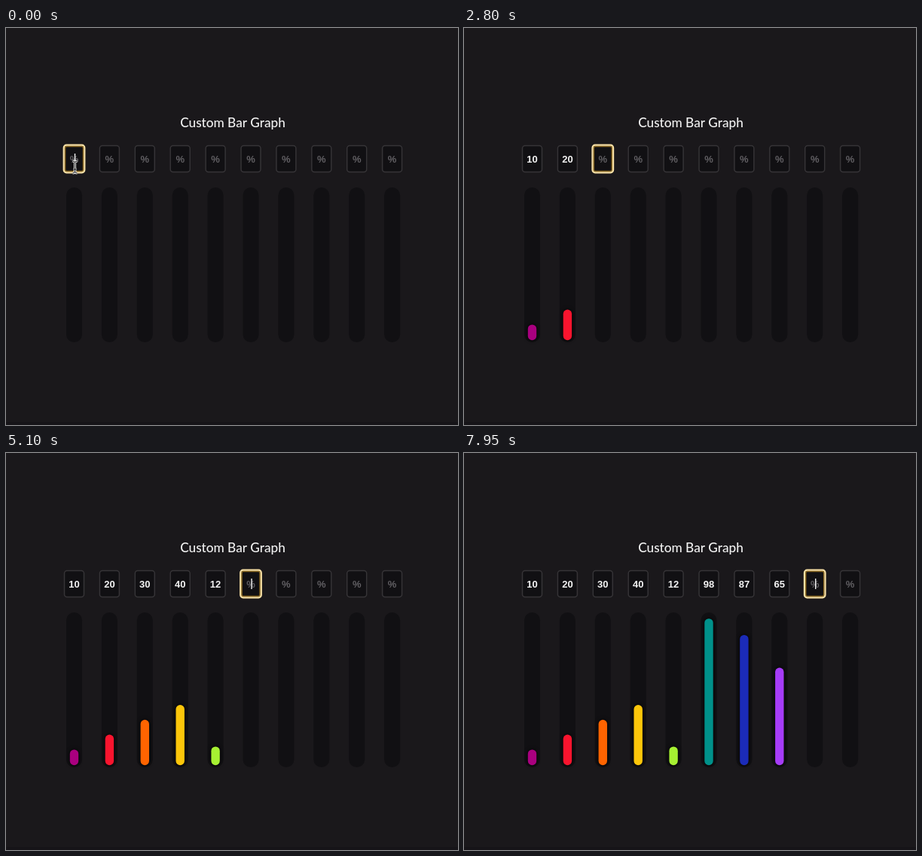
Animation of 600x528 px, one loop 8 s. Source, as an HTML page with a canvas:

```html
<!DOCTYPE html>
<html lang="en">
<head>
<meta charset="utf-8">
<title>Custom Bar Graph</title>
<style>
  html, body { margin: 0; width: 100%; height: 100%; overflow: hidden; background: #1a181b; }
  canvas { display: block; }
</style>
</head>
<body>
<canvas width="600" height="528"></canvas>
<script>
const ctx = document.querySelector('canvas').getContext('2d');
const LOOP = 8000, BLINK = 450, GROW = 400;
const FIELDS = 10, FIRST_X = 90.5, STEP = 46.9;

// One entry per filled field: value, colour, times of both digits and of Tab.
const entries = [
  ['10', '#a9007f', 1200, 1400, 1650],
  ['20', '#f9142e', 2050, 2200, 2300],
  ['30', '#ff6400', 2900, 3000, 3150],
  ['40', '#fcc60a', 3400, 3550, 3750],
  ['12', '#a6f032', 4350, 4500, 4700],
  ['98', '#00918a', 5500, 5700, 6100],
  ['87', '#1b2bb8', 6600, 6700, 6850],
  ['65', '#a63cf8', 7250, 7400, 7600]
].map(([value, color, first, second, tab]) => ({ value, color, first, second, tab }));

function pill(x, y, w, h, r, fill) {
  ctx.beginPath();
  ctx.roundRect(x, y, w, h, Math.min(r, h / 2));
  ctx.fillStyle = fill;
  ctx.fill();
}

function frame(x, y, w, h, r, color, line) {
  ctx.beginPath();
  ctx.roundRect(x, y, w, h, r);
  ctx.strokeStyle = color;
  ctx.lineWidth = line;
  ctx.stroke();
}

function label(text, x, y, font, color) {
  ctx.font = font;
  ctx.fillStyle = color;
  ctx.fillText(text, x, y);
}

const ease = p => {
  p = Math.max(0, Math.min(1, p));
  return p * p * (3 - 2 * p);
};

function level(e, t) {
  const digit = +e.value[0];
  const early = at => digit * ease((at - e.first) / GROW);
  if (t < e.second) return early(t);
  const from = early(e.second);
  return from + (e.value - from) * ease((t - e.second) / GROW);
}

function drawBar(x, e, t) {
  pill(x - 10.5, 212, 21, 206, 10.5, '#111013');
  const v = e ? level(e, t) : 0;
  if (v <= 0) return;
  const h = 1.98 * v + Math.min(1, v);
  ctx.save();
  ctx.shadowColor = '#000';
  ctx.shadowBlur = 5;
  pill(x - 5.7, 415.2 - h, 11.4, h, 5.7, e.color);
  ctx.restore();
}

function drawField(x, e, t, focus) {
  pill(x - 13.5, 156, 27, 36, 4, '#111013');
  if (focus) {
    frame(x - 12, 157.5, 24, 33, 2, '#8c6a22', 1.5);
    frame(x - 13.8, 155.7, 27.6, 36.6, 3.5, '#f8e0a4', 2.2);
  } else {
    frame(x - 13, 156.5, 26, 35, 3.5, '#363437', 1.5);
  }
  const text = e ? e.value.slice(0, (t >= e.first) + (t >= e.second)) : '';
  label(text || '%', x, 178.5, 'bold 13px "Liberation Sans", Arial, sans-serif', text ? '#f4f4f4' : '#626064');
  return text ? ctx.measureText(text).width / 2 : 0;
}

function drawCaret(x, since, t) {
  if (Math.floor((t - since) / BLINK) % 2) return;
  ctx.fillStyle = '#f0f0f0';
  ctx.fillRect(x, 167, 1.4, 14);
}

function drawPointer(x, y) {
  const shape = new Path2D(
    `M${x - 3} ${y} Q${x} ${y} ${x} ${y + 2} V${y + 14} Q${x} ${y + 16} ${x - 3} ${y + 16}` +
    `M${x + 3} ${y} Q${x} ${y} ${x} ${y + 2} M${x} ${y + 14} Q${x} ${y + 16} ${x + 3} ${y + 16}` +
    `M${x - 2} ${y + 11} h4`);
  for (const [color, line] of [['#eee', 3], ['#111', 1]]) {
    ctx.strokeStyle = color;
    ctx.lineWidth = line;
    ctx.stroke(shape);
  }
}

function draw(t) {
  ctx.fillStyle = '#1a181b';
  ctx.fillRect(0, 0, 600, 528);
  ctx.fillStyle = '#161418';
  ctx.fillRect(0, 524, 600, 4);
  ctx.textAlign = 'center';
  label('Custom Bar Graph', 301, 132, '500 17.2px Lato, sans-serif', '#f2f2f2');

  const active = entries.filter(e => t >= e.tab).length;
  for (let i = 0; i < FIELDS; i++) {
    const x = FIRST_X + i * STEP, e = entries[i];
    drawBar(x, e, t);
    const end = drawField(x, e, t, i === active);
    if (i === active) {
      const focused = i ? entries[i - 1].tab : -350;
      const keys = e ? [e.first, e.second].filter(k => k <= t) : [];
      drawCaret(x + end + 0.3, Math.max(focused, ...keys), t);
    }
  }
  if (t < entries[0].first) drawPointer(91.5, 177);
}

function tick(now) {
  draw(now % LOOP);
  requestAnimationFrame(tick);
}
requestAnimationFrame(tick);
</script>
</body>
</html>
```
